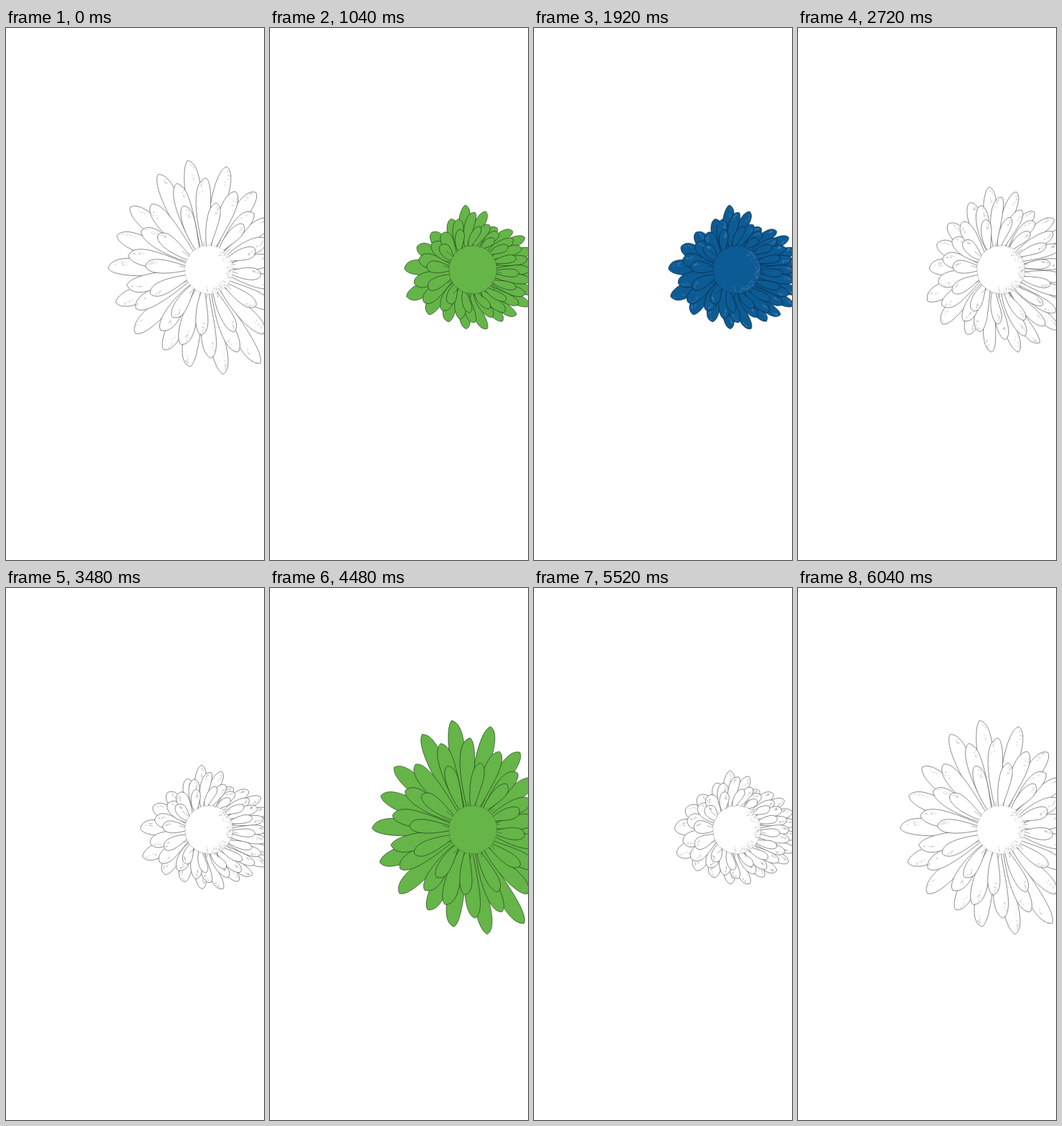
Animation, 360 px wide and 740 px high, one loop 6120 ms. Source, as an HTML page with a canvas:

```html
<!DOCTYPE html>
<html lang="en">
<head>
<meta charset="utf-8">
<title>Flower</title>
<style>
  html, body { margin: 0; width: 100%; height: 100%; overflow: hidden; background: #fff; }
  canvas { display: block; width: 360px; height: 740px; }
</style>
</head>
<body>
<canvas id="stage"></canvas>
<script>
const W = 360, H = 740, LOOP = 6120;
const CX = 283, CY = 336, DISC = 33, TAU = Math.PI * 2;
const canvas = document.getElementById('stage');
const ctx = canvas.getContext('2d');
const ratio = window.devicePixelRatio || 1;
canvas.width = W * ratio;
canvas.height = H * ratio;
ctx.scale(ratio, ratio);
ctx.lineCap = ctx.lineJoin = 'round';

// How far the petals reach, every 30 degrees clockwise from the right
const open = [105, 122, 148, 147, 128, 138, 141, 132, 151, 153, 126, 105];
const half = [100, 115, 117, 118, 101, 116, 100, 93, 100, 120, 92, 108];
const closed = [93, 95, 83, 85, 78, 100, 96, 79, 72, 94, 66, 85];

// Rings, back to front: share of the reach, share of the width, shift in petals
const rings = [
  { reach: 1, width: 1, shift: 0 },
  { reach: .78, width: .95, shift: .5 },
  { reach: .52, width: .78, shift: .2 }
];

const line = { fill: '#fff', ink: 'rgba(45,45,45,.72)', dots: 'rgba(70,70,70,.5)' };
const green = { fill: '#65b548', ink: 'rgba(25,45,22,.82)', dots: null };
const blue = { fill: '#0c5b95', ink: 'rgba(12,34,52,.88)', dots: 'rgba(175,190,200,.5)' };
const looks = [line, green, blue, line];

const noise = n => {
  const v = Math.sin(n * 127.1 + 11.7) * 43758.5453;
  return v - Math.floor(v);
};
const sway = n => noise(n) * 2 - 1;
const mix = (a, b, k) => a + (b - a) * k;
const polar = (a, r) => [CX + r * Math.cos(a), CY + r * Math.sin(a)];

function sample(keys, a) {
  const s = ((a / TAU % 1 + 1) % 1) * keys.length;
  const i = Math.floor(s);
  return mix(keys[i % keys.length], keys[(i + 1) % keys.length], s - i);
}

// Pose 0 is fully open, pose 5 the smallest
function reachAt(pose, a) {
  if (pose <= 2) return mix(sample(open, a), sample(half, a), pose / 2);
  return mix(DISC, sample(closed, a), 1 - (pose - 3) * .14);
}

function makePetals(pose) {
  const count = 18 + Math.min(pose, 3);
  const lean = Math.min(8 + 4 * pose, 20) * Math.PI / 180;
  const crowd = Math.min(pose, 3) * .1;
  const petals = [];
  rings.forEach((ring, r) => {
    const n = r === 2 ? Math.round(count * .67) : count;
    for (let i = 0; i < n; i++) {
      const seed = r * 40 + i + 1;
      const turn = Math.PI + (i + ring.shift + sway(seed) * .1) / n * TAU;
      const a = turn - crowd * Math.sin(turn);
      const tip = mix(DISC, reachAt(pose, a), ring.reach * (1 + sway(seed + 5) * .025));
      const leftward = Math.max(0, -Math.cos(a));
      petals.push({
        a, tip, seed,
        base: a + lean * Math.sin(a),
        w: (22 - 2.5 * Math.min(pose, 3)) * ring.width * (1 + .12 * (1 + pose) * leftward),
        skew: sway(seed + 9) * .3
      });
    }
  });
  return petals;
}
const poses = [0, 1, 2, 3, 4, 5].map(makePetals);

function stroke(x1, y1, x2, y2) {
  ctx.beginPath();
  ctx.moveTo(x1, y1);
  ctx.lineTo(x2, y2);
  ctx.stroke();
}

function drawPetal({ a, tip, base, w, skew, seed }, look) {
  const [x, y] = polar(a, tip), [bx, by] = polar(base, 30);
  const len = Math.hypot(x - bx, y - by);
  const nx = -(y - by) / len, ny = (x - bx) / len;
  // The stem leaves the disc radially, then leans to the tip
  const mx = bx + (x - bx) * .22 + Math.cos(base) * len * .22;
  const my = by + (y - by) * .22 + Math.sin(base) * len * .22;
  const far = Math.hypot(x - mx, y - my);
  const ux = (x - mx) / far, uy = (y - my) / far;
  const tx = x - ux * len * .07, ty = y - uy * len * .07;
  const l = w * (.76 + skew), r = w * (.76 - skew);

  ctx.beginPath();
  ctx.moveTo(bx + nx * w * .14, by + ny * w * .14);
  ctx.bezierCurveTo(mx + nx * w * .5, my + ny * w * .5, tx - uy * l, ty + ux * l, x, y);
  ctx.bezierCurveTo(tx + uy * r, ty - ux * r, mx - nx * w * .5, my - ny * w * .5,
    bx - nx * w * .14, by - ny * w * .14);
  ctx.fillStyle = look.fill;
  ctx.fill();
  ctx.strokeStyle = look.ink;
  ctx.lineWidth = .75;
  ctx.stroke();

  if (!look.dots || w < 12) return;
  ctx.strokeStyle = look.dots;
  ctx.lineWidth = .6;
  const side = Math.sign(skew);
  for (let i = 0; i < 7; i++) {
    const back = 3 + noise(seed * 9 + i) * len * .2;
    const off = side * w * (.15 + .2 * noise(seed * 5 + i * 3)) * Math.min(1, back / 7);
    const px = x - ux * back - uy * off, py = y - uy * back + ux * off;
    const d = .5 + noise(seed + i * 7) * 1.5;
    stroke(px, py, px - ux * d, py - uy * d);
  }
}

function drawDisc(look, pose) {
  const n = 34;
  ctx.beginPath();
  for (let i = 0; i <= n; i++) {
    const a = i / n * TAU;
    const p = polar(a, DISC - .6 + noise(i % n) * 1.4);
    if (!i) ctx.moveTo(...p);
    else ctx.quadraticCurveTo(...polar(a - Math.PI / n, DISC + 1.5), ...p);
  }
  ctx.fillStyle = look.fill;
  ctx.fill();
  ctx.strokeStyle = look.ink;
  ctx.lineWidth = .5;
  ctx.globalAlpha = pose < 2 ? .45 : .8;
  ctx.stroke();
  ctx.globalAlpha = 1;

  for (let i = 0; i < 12; i++) {
    const a = (i + noise(i + 40) * .7) / 12 * TAU;
    stroke(...polar(a, DISC + 1), ...polar(a + .03, DISC + 4 + noise(i + 70) * 9));
  }
  if (!look.dots) return;
  ctx.strokeStyle = look.dots;
  for (let i = 0; i < 75; i++) {
    const a = -1 + noise(i + 200) * 2.7;
    const r = DISC - 1 - noise(i + 300) ** 2 * 7;
    stroke(...polar(a, r), ...polar(a + .02, r - 1.4));
  }
}

// Closes over six steps, opens over six; each half has its own colour
function draw(step) {
  const k = step % 12;
  const pose = Math.min(k, 11 - k);
  const look = looks[Math.floor(step / 6) % looks.length];
  ctx.fillStyle = '#fff';
  ctx.fillRect(0, 0, W, H);
  poses[pose].forEach(petal => drawPetal(petal, look));
  drawDisc(look, pose);
}

// Five steps per 640 ms: one of 160, four of 120
function stepAt(t) {
  const s = t % 640;
  return Math.floor(t / 640) * 5 + (s < 160 ? 0 : 1 + Math.floor((s - 160) / 120));
}

let shown = 0;
draw(0);
const start = performance.now();
function tick() {
  const step = stepAt((performance.now() - start) % LOOP);
  if (step !== shown) draw(shown = step);
  requestAnimationFrame(tick);
}
requestAnimationFrame(tick);
</script>
</body>
</html>
```
